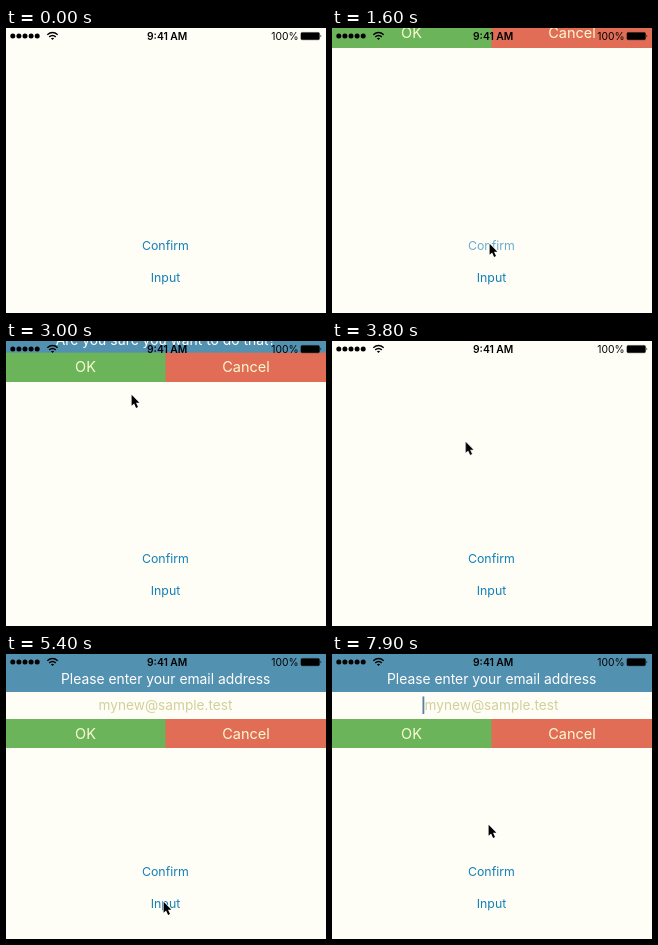
These frames come from a looping animation (320 by 285 pixels, 8000 ms). An HTML page:

```html
<!DOCTYPE html>
<html lang="en">
<head>
<meta charset="utf-8">
<title>Drop-down alerts</title>
<style>
  html, body { margin: 0; width: 100%; height: 100%; overflow: hidden; background: #fffef6; }
  svg { display: block; width: 320px; height: 285px; }
  text { font-family: Inter, "Liberation Sans", sans-serif; text-anchor: middle; }
  .link { font-size: 12.35px; fill: #1580b8; }
  .title { font-size: 13.85px; fill: #fff; }
  .hint { font-size: 13.65px; fill: #d2cf9c; }
  .button { font-size: 14.5px; fill: #f9fad2; }
  .status { font-size: 10.3px; }
  .bar { fill: #5391b0; }
  .ok { fill: #6cb45a; }
  .cancel { fill: #e16d56; }
  .paper { fill: #fffef6; }
</style>
</head>
<body>
<svg viewBox="0 0 320 285">
  <defs>
    <g id="buttons">
      <rect class="ok" width="160" height="29"/>
      <rect class="cancel" x="159.5" width="160.5" height="29"/>
      <text class="button" x="79.5" y="19.7">OK</text>
      <text class="button" x="240" y="19.7">Cancel</text>
    </g>
  </defs>

  <text id="confirm" class="link" x="159.4" y="221.6">Confirm</text>
  <text id="input" class="link" x="159.5" y="254.2">Input</text>

  <g id="ask">
    <rect class="bar" width="320" height="38.5"/>
    <text class="title" x="159.7" y="30">Are you sure you want to do that?</text>
    <use href="#buttons" y="38"/>
  </g>

  <g id="form">
    <rect class="bar" width="320" height="38"/>
    <text class="title" x="159.7" y="30">Please enter your email address</text>
    <rect class="paper" y="38" width="320" height="27.5"/>
    <text class="hint" x="159.5" y="56">mynew@sample.test</text>
    <rect id="caret" x="90.5" y="42.5" width="1.8" height="17.5" fill="#5580a8"/>
    <use href="#buttons" y="65"/>
  </g>

  <g id="statusbar">
    <path d="M6.8 8h25" fill="none" stroke="#000" stroke-width="5" stroke-linecap="round" stroke-dasharray="0 6.1"/>
    <g fill="none" stroke="#000" stroke-width="1.5">
      <path d="M41.3 6.7q5.2-4.4 10.4 0"/>
      <path d="M43.2 8.9q3.3-2.7 6.6 0"/>
    </g>
    <path d="M44.9 10.3q1.6-1.2 3.2 0l-1.6 1.8z"/>
    <text class="status" font-weight="600" x="161.2" y="11.8">9:41 AM</text>
    <text class="status" x="279" y="11.8">100%</text>
    <rect x="294.9" y="4.4" width="18.6" height="7.4" rx="1.3" stroke="#000" stroke-opacity=".45" stroke-width=".8"/>
    <path d="M314.5 6.6q1.6 1.4 0 2.8z"/>
  </g>

  <g id="cursor">
    <path d="M.6.8v11l2.5-2.3 2 4.4 1.9-.8-2-4.3h3.4z" stroke="#fff" stroke-width="1.4" paint-order="stroke"/>
  </g>
</svg>

<script>
const LOOP = 8000, STEP = 100;
const EASE = 'ease-in-out', HOLD = 'steps(1, end)';
const tracks = [];

// rows: [ms, value, easing towards the next row]
function track(id, prop, rows) {
  const keys = rows.map(([ms, value, easing = 'linear']) =>
    ({ offset: ms / LOOP, [prop]: value, easing }));
  const [last] = rows.slice(-1);
  if (last[0] < LOOP) keys.push({ offset: 1, [prop]: last[1] });
  const anim = document.getElementById(id).animate(keys, { duration: LOOP, fill: 'both' });
  anim.pause();
  tracks.push(anim);
}

const at = (x, y) => `translate(${x}px, ${y}px)`;

const press = (id, down, up) => track(id, 'opacity', [
  [0, 1, HOLD], [down, .2, HOLD], [up, .2], [up + 400, 1]
]);

press('confirm', 1300, 1380);
press('input', 4600, 4700);

track('ask', 'transform', [
  [0, at(0, -67), HOLD], [1450, at(0, -67), EASE], [1850, at(0, 0), HOLD],
  [2825, at(0, 0), EASE], [3225, at(0, -67)]
]);

track('form', 'transform', [
  [0, at(0, -94), HOLD], [4700, at(0, -94), EASE], [5100, at(0, 0)]
]);

track('caret', 'opacity', [
  [0, 0, HOLD], [5500, 1, HOLD], [6000, 1], [6200, 0, HOLD],
  [6500, 0], [6600, 1, HOLD], [7000, 1], [7200, 0, HOLD],
  [7500, 0], [7600, 1]
]);

track('cursor', 'opacity', [[0, 0, HOLD], [700, 1]]);

track('cursor', 'transform', [
  [0, at(318, 263), HOLD], [700, at(318, 263), EASE], [1200, at(157, 215), HOLD],
  [2000, at(157, 215), EASE], [2600, at(125, 53), HOLD],
  [3600, at(125, 53), EASE], [4200, at(160, 256), EASE], [4400, at(157, 247), HOLD],
  [5900, at(157, 247), EASE], [6700, at(156, 170)]
]);

const start = performance.now();

function draw() {
  const t = (performance.now() - start) % LOOP;
  const shown = Math.floor(t / STEP) * STEP;
  for (const anim of tracks) anim.currentTime = shown;
  requestAnimationFrame(draw);
}
draw();
</script>
</body>
</html>
```
